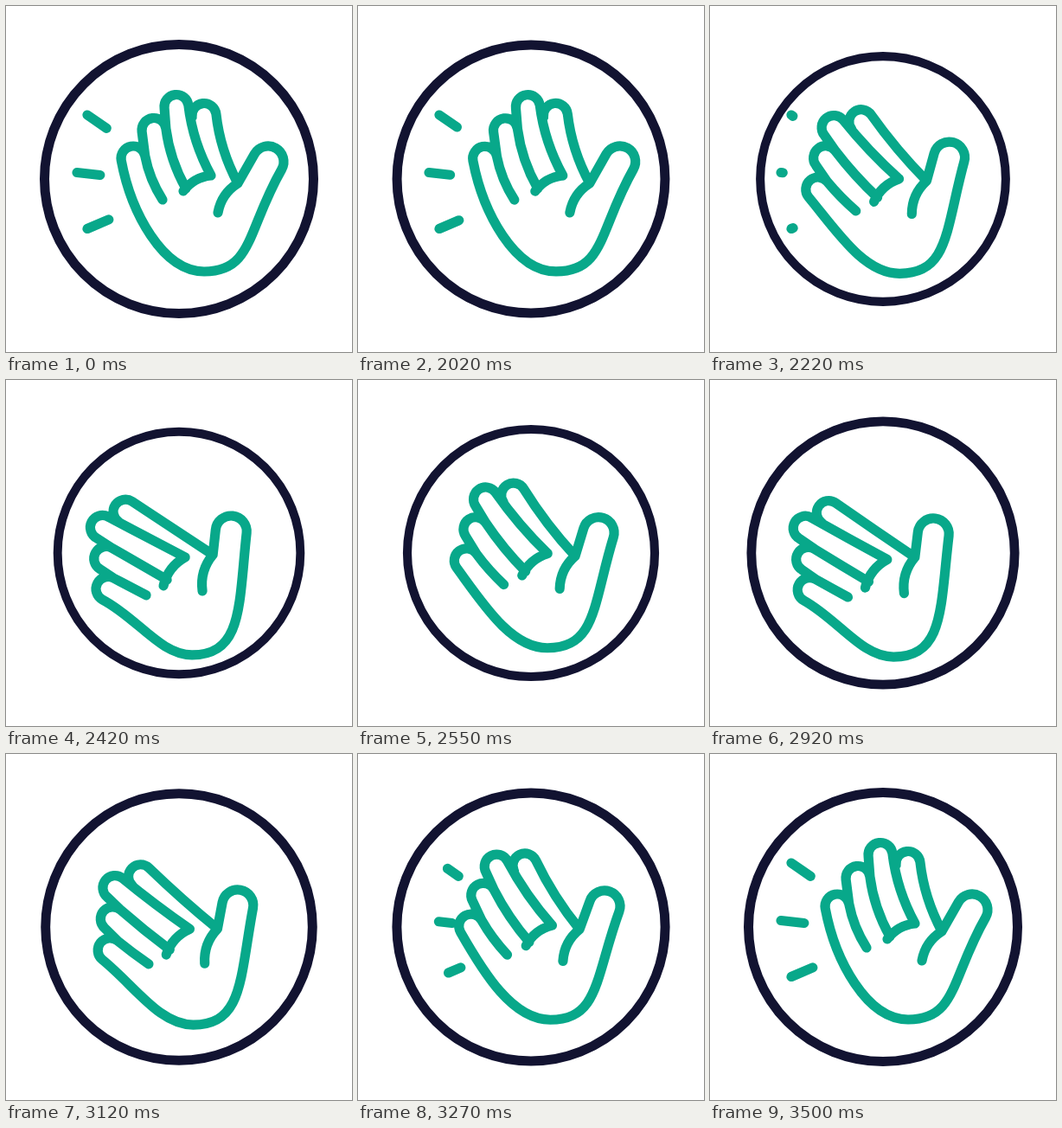
An HTML page that plays this animation: 400x400 px, repeating every 3.52 s.

```html
<!DOCTYPE html>
<html lang="en">
<head>
<meta charset="utf-8">
<title>Waving hand</title>
<style>
  html, body { margin: 0; width: 100%; height: 100%; overflow: hidden; background: #fff; }
  svg { display: block; width: 100%; height: 100%; }
  path { fill: none; stroke: #08a88a; stroke-width: 11.2; stroke-linecap: round; stroke-linejoin: round; }
  circle { fill: none; stroke: #121331; stroke-width: 11; }
</style>
</head>
<body>
<svg viewBox="0 0 400 400">
  <circle id="ring" cx="200" cy="200" r="155.5"/>
  <path id="rays"/>
  <path id="hand"/>
</svg>
<script>
const LOOP = 3520;
const FINGER = 14, THUMB = 18;  // radii of the tips
const BEND = .19;               // curl of the upright fingers
const TILT = 35 * Math.PI / 180;
const PIVOT = [220, 270];

// Joints: upright place, tilted place. A finger's side runs from its tip to its root.
const JOINTS = {
  tip0: [[147, 176], [118, 242]], root0: [[181, 224], [162, 249]],
  tip1: [[171, 143.5], [115.5, 207]], root1: [[208, 211], [186, 231]],
  tip2: [[197, 116.5], [111, 171]], root2: [[237, 196], [207, 205]],
  tip3: [[229, 126.5], [137.5, 152.5]], root3: [[268, 205], [239, 202]],
  thumb: [[303, 180], [260, 175]], heel: [[229, 307], [215, 318]],
  palmFold: [[205, 214], [182, 238]], thumbFold: [[245, 239], [227, 244]]
};
const RAYS = [[94, 126], [82, 192.5], [94, 257.5]];
const RAY_FOCUS = [212, 207], RAY_LENGTH = 27;

const lerp = (a, b, u) => a + (b - a) * u;
const mix = (p, q, u) => [lerp(p[0], q[0], u), lerp(p[1], q[1], u)];
const add = (p, q, k = 1) => [p[0] + q[0] * k, p[1] + q[1] * k];
const dist = (p, q) => Math.hypot(p[0] - q[0], p[1] - q[1]);

function rotate([x, y], a) {
  const c = Math.cos(a), s = Math.sin(a);
  return [x * c + y * s, y * c - x * s];
}

function bezier(x1, y1, x2, y2) {
  const at = (a, b, s) => 3 * a * s * (1 - s) ** 2 + 3 * b * s * s * (1 - s) + s ** 3;
  return x => {
    let lo = 0, hi = 1;
    for (let i = 0; i < 24; i++) {
      const mid = (lo + hi) / 2;
      if (at(x1, x2, mid) < x) lo = mid; else hi = mid;
    }
    return at(y1, y2, lo);
  };
}
const linear = u => u;
const ease = bezier(.25, .1, .25, 1);
const inOut = bezier(.36, 0, .64, 1);

// Keys are [time, value, easing towards this key].
function track(keys, t) {
  const i = keys.findIndex(k => t < k[0]);
  if (i === 0) return keys[0][1];
  if (i < 0) return keys[keys.length - 1][1];
  const [t0, v0] = keys[i - 1], [t1, v1, fn] = keys[i];
  return lerp(v0, v1, fn((t - t0) / (t1 - t0)));
}
const SCALE = [[2000, 1], [2375, .9, ease], [3500, 1, ease]];
const WAVE = [[2000, 0], [2405, 1, inOut], [2695, 0, inOut], [2950, 1, inOut], [3500, 0, inOut]];
const DRIFT = [[2420, 0], [2700, 1, inOut], [2930, 1, linear], [3150, 0, inOut]];
const RAY_OUT = [[2000, 0], [2240, 1, linear]];
const RAY_IN = [[3160, 0], [3490, 1, ease]];

// Joints swing along an arc while the hand changes shape.
function pose(m, shift) {
  const out = {};
  for (const [name, [up, tilted]] of Object.entries(JOINTS)) {
    const a = add(up, PIVOT, -1), b = rotate(add(tilted, PIVOT, -1), -TILT);
    out[name] = add(add(rotate(mix(a, b, m), TILT * m), PIVOT), shift);
  }
  return out;
}

// Round tip whose side (1 right, -1 left) is tangent to the line from root.
function cap(tip, root, r, side, bend) {
  const v = add(tip, root, -1);
  const a = Math.atan2(v[0], -v[1]) + side * (Math.asin(r / Math.hypot(...v)) + bend);
  const down = [-Math.sin(a), Math.cos(a)], across = [Math.cos(a), Math.sin(a)];
  const left = add(tip, across, -r), right = add(tip, across, r);
  return { left, right, down, arc: `L${left}A${r},${r} 0 0 1 ${right}` };
}

function sideTo(c, root) {
  return `Q${add(c.right, c.down, dist(c.right, root) / 2)} ${root}`;
}

function fold(p, q) {
  const ctrl = add(mix(p, q, .5), [q[1] - p[1], p[0] - q[0]], .22);
  return `M${p}Q${ctrl} ${q}`;
}

function handPath(m, shift) {
  const j = pose(m, shift);
  const bend = BEND * (1 - m);
  const caps = [0, 1, 2, 3].map(i => cap(j["tip" + i], j["root" + i], FINGER, 1, bend));
  const thumb = cap(j.thumb, j.root3, THUMB, -1, 0);
  const little = caps[0];
  const wide = dist(thumb.right, j.heel), narrow = dist(little.left, j.heel);

  let d = `M${j.root3}${thumb.arc}` +
    `C${add(thumb.right, thumb.down, wide * .55)} ${add(j.heel, [wide * .38, 0])} ${j.heel}` +
    `C${add(j.heel, [-narrow * .3, 0])} ${add(little.left, little.down, narrow * .38)} ${little.left}`;
  caps.forEach((c, i) => {
    if (i) d += `M${caps[i - 1].right}`;
    d += c.arc + sideTo(c, j["root" + i]);
  });
  return d + fold(j.palmFold, j.root2) + fold(j.thumbFold, j.root3);
}

// Rays shrink to their outer ends, then grow back from the inner ends.
function rayPath(t) {
  const back = t >= 3000;
  const from = back ? 1 - track(RAY_IN, t) : 0;
  const to = back ? 1 : 1 - track(RAY_OUT, t);
  if (to - from < .001) return "";
  return RAYS.map(p => {
    const toFocus = add(RAY_FOCUS, p, -1);
    const k = RAY_LENGTH / Math.hypot(...toFocus);
    return `M${add(p, toFocus, k * from)}L${add(p, toFocus, k * to)}`;
  }).join("");
}

const $ = id => document.getElementById(id);

function draw(t) {
  const drift = track(DRIFT, t);
  $("ring").setAttribute("transform", `translate(200 200) scale(${track(SCALE, t)}) translate(-200 -200)`);
  $("hand").setAttribute("d", handPath(track(WAVE, t), [-3 * drift, 3 * drift]));
  $("rays").setAttribute("d", rayPath(t));
}

let origin;
function tick(now) {
  origin ??= now;
  draw((now - origin) % LOOP);
  requestAnimationFrame(tick);
}
draw(0);
requestAnimationFrame(tick);
</script>
</body>
</html>
```
